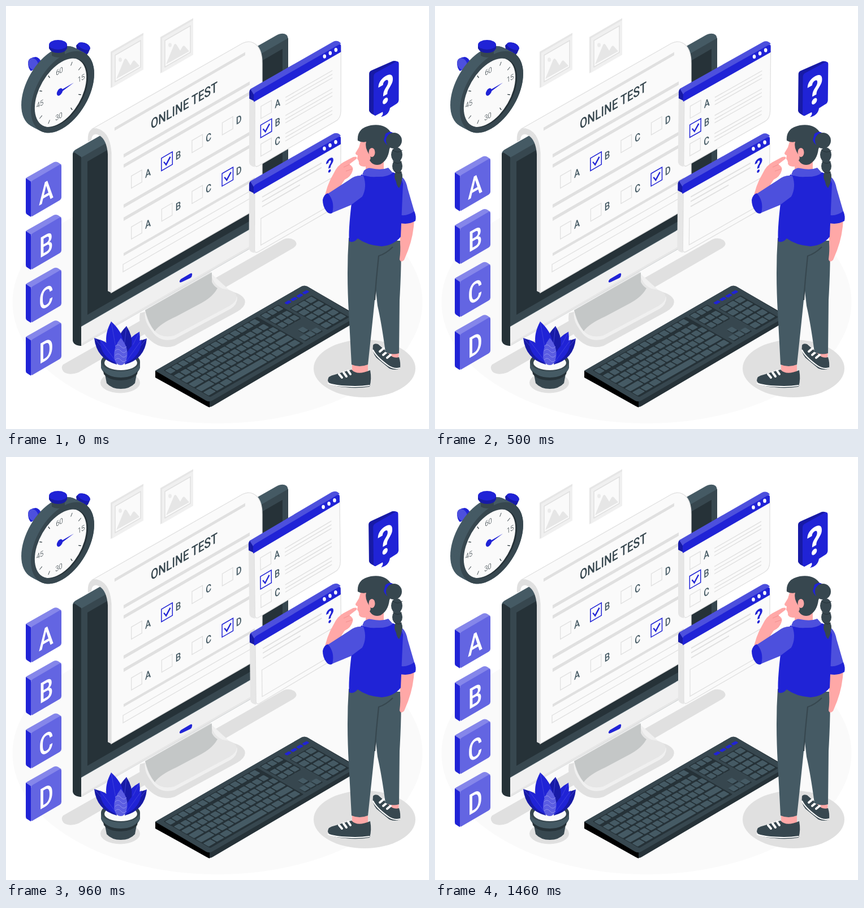
These frames come from a looping animation (748 by 748 pixels, 1500 ms). An HTML page:

```html
<!DOCTYPE html>
<html lang="en">
<head>
<meta charset="utf-8">
<title>Online test</title>
<style>
html, body { margin: 0; width: 100%; height: 100%; overflow: hidden; background: #fff; }
svg { display: block; width: 100vw; height: 100vh; }
text { font-family: Roboto, Inter, sans-serif; font-weight: 500; text-anchor: middle; }
</style>
</head>
<body>
<svg id="stage" viewBox="0 0 748 748"></svg>
<script>
const S = 0.5774; // isometric slope
const BLUE = '#2023d6', MID = '#4d50dd', NAVY = '#171aa6';
const SLATE = '#455a64', DARK = '#37474f', INK = '#263238';
const PAPER = '#fafafa', LINE = '#e0e0e0', SKIN = '#ffa8a7';

const path = (d, fill, extra = '') => `<path d="${d}" fill="${fill}" ${extra}/>`;
const stroke = (d, color, w, extra = '') =>
  `<path d="${d}" fill="none" stroke="${color}" stroke-width="${w}" ${extra}/>`;
const oval = (x, y, rx, ry, fill, extra = '') =>
  `<ellipse cx="${x}" cy="${y}" rx="${rx}" ry="${ry}" fill="${fill}" ${extra}/>`;
const group = (items, attr = '') => `<g ${attr}>${items.join('')}</g>`;
const slantD = (x1, y1, x2, h) => {
  const y2 = y1 - S * (x2 - x1);
  return `M${x1} ${y1}L${x2} ${y2}V${y2 + h}L${x1} ${y1 + h}Z`;
};
const bar = (x1, y, x2, h, fill = LINE) => path(slantD(x1, y, x2, h), fill);
const frame = (x1, y, x2, h, color = LINE, w = 1.3) => stroke(slantD(x1, y, x2, h), color, w);
const iso = (x, y, k = 0.866) => `transform="matrix(${k} ${-k * S} 0 1 ${x} ${y})"`;
// y is the visual centre of the capitals
const label = (s, x, y, size, fill, k = 0.8, extra = '') =>
  `<text ${iso(x, y + size * 0.356, k)} font-size="${size}" fill="${fill}" ${extra}>${s}</text>`;

function box(x, y, on) {
  const r = on ? 9.7 : 9.3;
  const square = frame(x - r, y - r * 1.15 + S * r, x + r, r * 2.3, on ? BLUE : LINE, on ? 1.5 : 1.3);
  return square + (on ? stroke(`M${x - 5.5} ${y + 1}L${x - 1.5} ${y + 6}L${x + 6} ${y - 8}`, BLUE, 2.3) : '');
}

function floor() {
  return oval(374, 524, 362.5, 214, PAPER) +
    path('M101 634L490 413Q500 408 510 414Q518 421 508 428L128 648Q112 654 102 647Q96 640 101 634Z', LINE) +
    oval(634, 641, 90, 51, LINE) +
    oval(202, 666, 35, 18.5, LINE);
}

function picture(x, y) {
  return bar(x, y, x + 58, 64, '#e6e6e6') +
    bar(x + 3, y + 2, x + 58, 61, '#f0f0f0') +
    bar(x + 8, y + 6, x + 53, 47, PAPER) +
    frame(x + 8, y + 6, x + 53, 47, LINE, 1.5) +
    path(`M${x + 10} ${y + 48}L${x + 24} ${y + 14}Q${x + 26} ${y + 10} ${x + 29} ${y + 14}L${x + 35} ${y + 24}L${x + 39} ${y + 17}Q${x + 41} ${y + 14} ${x + 43} ${y + 16}L${x + 51} ${y + 25}Z`, '#e6e6e6') +
    oval(x + 17, y + 14, 3, 3.8, '#ebebeb');
}

function stopwatch() {
  const disc = (x, y, r, fill, extra = '') => `<circle ${iso(x, y)} r="${r}" fill="${fill}" ${extra}/>`;
  let hull = '';
  for (let i = 0; i <= 17; i++) hull += disc(83 + i, 143 + i * 9 / 17, 64.6, SLATE);
  let ticks = '';
  for (let i = 0; i < 12; i++) {
    if (i % 3) ticks += `<path d="M0 -43V-49" transform="rotate(${i * 30})" stroke="${INK}" stroke-width="1.1"/>`;
  }
  const num = (s, x, y) => label(s, x, y, 13, INK, 0.85, 'style="font-weight:300"');
  return path('M45 107L59 100L66 112L54 122Z', DARK) +
    path('M39 101Q40 91 53 90Q60 92 62 99L58 108L44 115Q39 110 39 101Z', BLUE) +
    oval(48, 102.5, 8.5, 11, MID, 'transform="rotate(-28 48 102.5)"') +
    path('M128 80L144 84L141 98L124 88Z', DARK) +
    path('M124 70Q129 63 139 65Q148 68 149 75L145 84Q141 87 137 82L125 77Z', NAVY) +
    oval(138, 71, 11.5, 5.5, BLUE, 'transform="rotate(24 138 71)"') +
    hull +
    path('M81 76H104V88Q92 94 81 88Z', DARK) +
    path('M76 68V75Q80 83 92 83Q104 83 108 75V68Z', NAVY) +
    oval(92, 68.5, 16, 8.5, BLUE) +
    disc(100, 152, 64.6, DARK) + disc(98, 153.5, 54.5, INK) +
    `<clipPath id="dial">${disc(98, 153.5, 54.5, '#000')}</clipPath>` +
    group([
      disc(95, 153, 54.5, PAPER),
      group([ticks], iso(96, 153.5)),
      num('60', 94.5, 115), num('15', 133, 127.5), num('30', 93.5, 195), num('45', 60, 173)
    ], 'clip-path="url(#dial)"') +
    path('M94 150.5L120 135.5L96 153.5Z', BLUE) +
    disc(95, 152, 6, BLUE);
}

function stand() {
  return path('M237 543Q233 566 247 583Q270 610 298 601L408 541Q426 531 422 519Q415 506 390 504Z', LINE) +
    path('M246 540Q243 556 258 575Q272 596 298 589L398 535Q409 528 409 515L364 474Z', '#f0f0f0') +
    path('M246 537L362 470Q365 492 383 500Q408 503 408 515Q407 523 396 530L297 583Q275 588 263 575Q250 562 246 537Z', '#e6e6e6') +
    path('M246 538L364 471V488Q367 495 374 499Q366 514 346 525L301 549Q272 562 263 575Q252 562 246 538Z', '#c4c7c7');
}

function monitor() {
  return path('M118 262Q118 257 123 254L478 52Q489 46 496 51Q499 54 499 61V390L133 601Q118 600 118 590Z', SLATE) +
    path('M118 262Q119 259 121 259L133 267V601Q118 600 118 590Z', INK) +
    bar(133, 268, 499, 298, DARK) +
    bar(144, 275, 489, 271, INK) +
    bar(133, 567, 499, 34, '#f0f0f0') +
    bar(133, 597, 499, 4, '#e6e6e6') +
    path('M309 483L326 473Q330 471 329 476Q329 479 326 481L311 488Q306 490 307 486Z', BLUE);
}

function sheet() {
  let out = path('M145 240Q143 217 158 216Q184 221 186 262V507L180 504V262Q178 233 161 227Q152 225 151 237Z', LINE) +
    path('M153 217L418 66Q432 59 443 69Q453 79 453 101V353L186 507V262Q184 222 160 217Z', PAPER,
      `stroke="${LINE}" stroke-width="1.3"`) +
    bar(192, 215, 423, 5.5) +
    label('ONLINE TEST', 315, 175.5, 24.5, DARK, 0.79) +
    bar(208, 262, 431, 6) + bar(208, 280, 431, 6) +
    bar(208, 351, 431, 6) + bar(208, 374, 431, 6) +
    bar(208, 437, 440, 5) +
    frame(207, 457, 440, 13);
  [[1, 306], [3, 396]].forEach(([on, y0]) => {
    [...'ABCD'].forEach((c, i) => {
      const x = 231 + i * 53.6, y = y0 - i * 31.4;
      out += box(x, y, i === on) + label(c, x + 20, y - 11, 18.5, SLATE, 0.82);
    });
  });
  return out;
}

function pane(y, h) {
  const dots = [563, 573, 583].map(x => oval(x, y + 7 - S * (x - 440), 2.8, 3.6, '#fff'));
  return path(`M430 ${y + 9}L440 ${y + 14}V${y + h}Q430 ${y + h - 2} 430 ${y + h - 9}Z`, '#e6e6e6') +
    path(`M440 ${y + 14}L592 ${y - 74}V${y + h - 100}Q592 ${y + h - 86} 582 ${y + h - 81}L446 ${y + h - 2}Q440 ${y + h + 1} 440 ${y + h - 6}Z`,
      PAPER, `stroke="${LINE}" stroke-width="1.3"`) +
    path(`M430 ${y}Q430 ${y - 5} 434 ${y - 7}L440 ${y}V${y + 16}L430 ${y + 11}Z`, NAVY) +
    path(`M432 ${y - 6}L578 ${y - 90}Q586 ${y - 94} 592 ${y - 87}L445 ${y - 1}Q440 ${y + 2} 438 ${y + 4}Z`, MID) +
    path(`M438 ${y + 5}Q439 ${y + 1} 443 ${y - 1}L588 ${y - 85}Q592 ${y - 87} 592 ${y - 82}V${y - 72}L438 ${y + 17}Z`, BLUE) +
    dots.join('');
}

function panes() {
  let out = pane(316, 121) +
    [337, 345, 354].map((y, i) => bar(453, y, i === 2 ? 520 : 558, 2.2)).join('') +
    frame(451, 376, 584, 47) +
    label('?', 572.5, 281.5, 34, BLUE, 0.86, 'style="font-weight:700"') +
    pane(153, 132);
  [...'ABC'].forEach((c, i) => {
    const y = 183 + i * 33.3;
    out += box(460, y, i === 1) + label(c, 480, y - 11, 18.5, SLATE, 0.8);
    for (let j = 0; j < 3; j++) out += bar(494, 161 + i * 32 + j * 6.5, 577, 1.6);
  });
  return out;
}

function bubble() {
  return path('M642 120Q642 116 646 114L684 97Q690 96 693 99L654 124V194Q643 190 642 185Z', NAVY) +
    path('M650 125Q650 120 654 118L690 98Q694.5 97 694.5 102V166Q694 171 690 173L679 180Q677 193 663 196Q668 191 666 187L655 193Q650 195 650 190Z', BLUE) +
    label('?', 671.5, 148, 67, '#fff', 0.87, 'style="font-weight:700"');
}

function keyboard() {
  const rect = (u, v, w, h, fill) => `<rect x="${u}" y="${v}" width="${w}" height="${h}" rx="1.5" fill="${fill}"/>`;
  let keys = '';
  const key = (u, v, w, h = 12.5) => { keys += rect(u - 1, v + 1, w, h, INK) + rect(u, v - 0.5, w - 1.2, h - 1, SLATE); };
  const rows = [10, 28, 43, 58, 73, 88];
  keys += rect(9, 8, 190, 95, INK) + rect(204, 8, 38, 46, INK) + rect(247, 26, 45, 77, INK);
  rows.forEach((v, r) => {
    if (r === 5) {
      [16, 16, 16, 70, 16, 16, 16, 16].reduce((u, w) => (key(u, v, w), u + w + 0.8), 10);
    } else {
      const first = [12, 12, 18, 22, 28][r];
      key(10, v, first);
      const n = [13, 13, 12, 11, 10][r], pitch = 13.2;
      for (let i = 0; i < n; i++) key(11 + first + i * pitch, v, 12.4);
      const end = 11 + first + n * pitch;
      if (end < 194) key(end, v, 198 - end);
    }
    if (r < 3) for (let i = 0; i < 3; i++) key(205 + i * 12.3, v, 11.5);
    if (r > 0) for (let i = 0; i < 3; i++) key(248 + i * 14.6, v, 13.8);
  });
  key(217.3, 73, 11.5);
  for (let i = 0; i < 3; i++) key(205 + i * 12.3, 88, 11.5);
  for (let i = 0; i < 4; i++) keys += rect(251 + i * 12, 11, 9.5, 6, BLUE);
  return path('M264 645L519 498Q526 493 533 496L621 547V557L366 707Q360 711 354 707L264 656Z', INK) +
    path('M264 645L360 699V710L264 657Z', '#000') +
    path('M264 645L519 498Q526 492 533 496L621 549L366 697Q360 701 354 698Z', DARK) +
    group([keys], 'transform="matrix(.87 -.5 .866 .495 264 645)"');
}

function leaf(tx, ty, bx, by, w, fill) {
  const dx = bx - tx, dy = by - ty, n = Math.hypot(dx, dy);
  const px = -dy / n * w, py = dx / n * w, mx = tx + dx * 0.5, my = ty + dy * 0.5;
  return path(`M${tx} ${ty}Q${mx + px} ${my + py} ${bx} ${by}Q${mx - px} ${my - py} ${tx} ${ty}Z`, fill) +
    stroke(`M${tx} ${ty}L${bx} ${by}`, MID, 0.7);
}

function plant() {
  let waves = '';
  for (let i = 0; i < 4; i++) waves += stroke(`M193 ${602 + i * 8}q5 -6 10 0t10 0`, '#8c8eee', 1);
  return path('M173 640L178 667Q187 677 203 677Q219 677 228 667L233 640Z', DARK) +
    path('M168 629V640Q174 657 203 657Q231 657 237 640V629Z', SLATE) +
    path('M172 645Q182 657 203 657Q224 657 233 645L232 651Q222 662 203 662Q182 662 173 651Z', INK) +
    oval(202.5, 629, 34.5, 17, DARK) + oval(203, 631, 29, 13, PAPER) +
    leaf(156, 587, 196, 634, 21, NAVY) + leaf(249, 588, 210, 634, 21, NAVY) +
    leaf(236, 576, 208, 632, 22, BLUE) + leaf(213, 566, 206, 630, 26, NAVY) +
    leaf(186, 558, 199, 632, 30, BLUE) + leaf(166, 590, 197, 632, 18, BLUE) +
    leaf(240, 590, 210, 632, 17, BLUE) +
    path('M203 587Q217 603 214 621Q211 635 203 635Q194 635 191 621Q190 603 203 587Z', '#5b5de2') + waves;
}

function shoe(d, sole, laces) {
  return path(d, DARK) + stroke(sole, '#fff', 2) + stroke(laces, '#fff', 4, 'stroke-linecap="round"');
}

function girl() {
  const braid = [[691, 263, 10, 13], [692, 283, 9, 12], [694, 301, 7, 11]];
  return path('M677 606H695L694 628Q684 632 675 622Z', SKIN) +
    shoe('M649 600Q651 596 658 598L676 614Q684 624 695 621Q698 630 697 641Q688 645 678 641L655 622Q647 612 649 600Z',
      'M649 608Q654 620 676 636Q686 643 697 640', 'M661 611L668 605M667 617L674 611M674 622L680 617') +
    path('M612 630H640V650Q625 656 612 647Z', SKIN) +
    shoe('M569 662Q569 654 581 652L611 643Q621 654 644 644Q647 660 643 673Q620 677 600 674Q570 672 569 662Z',
      'M569 667Q582 672 604 672.5Q624 674 643 671', 'M589 651L594 657M597 648L602 655M605 645L609 651') +
    // trousers
    path('M652 415H698Q700 450 696 520L695 614Q683 618 671 612Q664 560 657 530L648 450Z', SLATE) +
    path('M606 410Q602 470 606 540L611 634Q625 640 640 634Q648 560 652 520L656 465Q680 445 682 412Z', SLATE) +
    stroke('M684 426Q672 438 659 442L655 482L652 520', DARK, 2.2) +
    // far arm
    path('M697 376H722Q721 405 711 432L704 449Q698 455 696 448Q698 432 697 420Z', SKIN) +
    path('M690 298Q706 300 710 322L724 370Q710 376 695 372Z', MID) +
    path('M694 369Q708 373 722 363Q726 372 724 380Q710 388 694 383Z', BLUE) +
    // body
    path('M636 270H668V298Q650 304 636 296Z', SKIN) +
    path('M628 298Q655 306 684 294Q698 298 702 314Q700 360 698 408Q686 423 664 425Q638 423 622 411Q614 420 607 416Q605 400 611 348Z', BLUE) +
    path('M633 291Q640 285 646 287Q664 291 676 286L684 295Q674 303 655 302Q640 303 630 298Z', MID) +
    // near arm
    path('M562 346Q566 318 580 295Q586 282 597 276L614 267Q622 265 620 270L607 280Q615 284 613 291Q610 302 599 307Q589 320 582 342Z', SKIN) +
    stroke('M597 285L608 280M601 292L613 288', '#f28f8f', 1) +
    path('M569 332L606 308Q618 298 632 300Q639 320 630 337L610 352L576 366Q578 346 569 332Z', MID) +
    path('M560 343Q562 333 569 331Q582 345 577 366Q571 369 566 362Q560 354 560 343Z', BLUE) +
    // head
    path('M630 230L624 250L618 260Q618 263 622 264L621 270Q625 274 624 279Q627 286 640 283L664 276V240Z', SKIN) +
    path('M622 238Q620 216 645 211Q672 207 682 226Q685 240 678 253Q676 272 662 280Q650 284 643 273Q647 268 642 262Q634 250 637 240Q629 242 622 238Z', DARK) +
    oval(647, 259, 5.5, 8, SKIN) +
    path('M671 226Q679 220 684 224L681 248Q671 247 668 237Z', BLUE) +
    oval(686, 238, 14, 14, DARK) +
    braid.map(([x, y, rx, ry]) => oval(x, y, rx, ry, DARK)).join('') +
    path('M689 304L700 304Q700 314 695 322Q690 318 689 304Z', DARK) +
    stroke('M683 254Q692 262 701 255M684 274Q692 282 700 275M687 292Q694 298 700 293', INK, 1);
}

function blocks() {
  return [...'ABCD'].map((c, i) => group([
    path('M35 307Q35 304 38 303L84 277Q88 275 92 277L98 281L44 313Z', '#8586ea'),
    path('M35 305L44 311V373.5L37 369Q35 368 35 365Z', BLUE),
    path('M44 314Q44 311 47 309L95 281Q98 280 98 284V339Q98 342 95 344L47 372Q44 374 44 370Z', '#6365e2'),
    label(c, 71, 328.5, 50, '#fff', 0.78)
  ], `transform="translate(0 ${i * 93.6 + 0.3})"`)).join('');
}

document.getElementById('stage').innerHTML =
  floor() + picture(185, 81) + picture(273, 55) + stopwatch() + stand() + monitor() + sheet() +
  group([panes()], 'id="panes"') + group([bubble()], 'id="bubble"') +
  keyboard() + plant() + girl() + group([blocks()], 'id="blocks"');

const [panesEl, bubbleEl, blocksEl] = ['panes', 'bubble', 'blocks'].map(id => document.getElementById(id));
const LOOP = 1500, STEPS = 36;

function draw() {
  const step = Math.floor(performance.now() % LOOP / LOOP * STEPS);
  const p = (step + 1) / STEPS % 1;
  const rise = 15 * (1 - Math.abs(1 - 2 * p));
  const tilt = p < 0.25 ? 4 * p : p < 0.75 ? 2 - 4 * p : 4 * p - 4;
  blocksEl.setAttribute('transform', `translate(0 ${-rise})`);
  panesEl.setAttribute('transform', `rotate(${tilt} 511 250)`);
  bubbleEl.setAttribute('transform', `rotate(${tilt} 600 190)`);
  requestAnimationFrame(draw);
}
draw();
</script>
</body>
</html>
```
